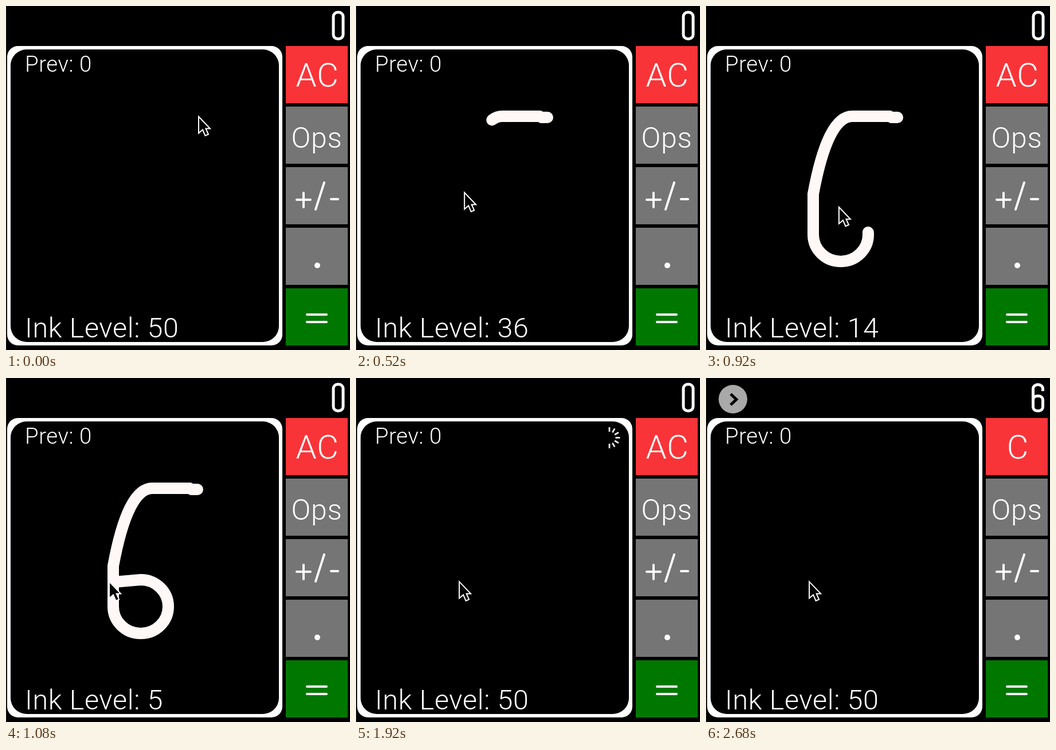
These frames come from a looping animation (600x602 px, 3440 ms). An HTML page with a canvas:

```html
<!DOCTYPE html>
<html lang="en">
<head>
<meta charset="utf-8">
<title>Handwriting calculator</title>
<style>
  html, body { margin: 0; width: 100%; height: 100%; overflow: hidden; background: #000; }
  canvas { display: block; width: 600px; height: 602px; }
</style>
</head>
<body>
<canvas id="stage" width="600" height="602"></canvas>
<script>
const ctx = document.getElementById('stage').getContext('2d');
const LOOP = 3440, STEP = 40;
const PEN_LAG = 120, INK_START = 270, INK_STOP = 1080, INK_RATE = 0.055;
const SPIN_START = 1440, SPIN_STEP = 80, RESULT = 2400, FADE = 200;

// A hand-drawn six: top bar, back, and a round bowl that closes on itself.
const SIX = 'M334 195H324L320 193H255Q212 193 187 329V400' +
  'A48 47 0 0 0 283 400A48 47 0 0 0 235 353L177 358';
const sixShape = new Path2D(SIX);
const sixGuide = document.createElementNS('http://www.w3.org/2000/svg', 'path');
sixGuide.setAttribute('d', SIX);

// Pen speed: [time, distance along the stroke].
const pace = [[320, 0], [360, 8], [480, 52], [640, 239], [920, 464], [1040, 540], [1100, 592]];

const arrowShape = new Path2D('M1 2V31L8 25L12.5 35.5L18 33L13.5 23H21Z');
const zeroShape = new Path2D();
zeroShape.roundRect(571, 11, 17, 46.5, 7.5);
const sixDigit = new Path2D('M570.5 40V19A8.5 7.5 0 0 1 587.5 19V23');
sixDigit.roundRect(570.5, 31.5, 17, 26, 7);

const clamp01 = v => Math.max(0, Math.min(1, v));

function penDistance(t) {
  return pace.slice(1).reduce((d, [t1, d1], i) => {
    const [t0, d0] = pace[i];
    return d + (d1 - d0) * clamp01((t - t0) / (t1 - t0));
  }, 0);
}

function box(x, y, w, h, radius, color) {
  ctx.fillStyle = color;
  ctx.beginPath();
  ctx.roundRect(x, y, w, h, radius);
  ctx.fill();
}

function disc(x, y, r, color) {
  box(x - r, y - r, 2 * r, 2 * r, r, color);
}

function stroke(path, width, color = '#fff', cap = 'round') {
  ctx.strokeStyle = color;
  ctx.lineWidth = width;
  ctx.lineCap = cap;
  ctx.stroke(typeof path === 'string' ? new Path2D(path) : path);
}

function label(text, x, y, size, align = 'left') {
  ctx.font = `300 ${size}px Roboto, sans-serif`;
  ctx.letterSpacing = size * 0.013 + 'px';
  ctx.textAlign = align;
  ctx.fillStyle = '#fff';
  ctx.fillText(text, x, y);
}

function drawButtons(fade) {
  for (let i = 0; i < 5; i++) {
    const color = i === 0 ? '#f93438' : i === 4 ? '#007800' : '#757575';
    box(488, 70 + i * 106, 108, 100, 0, color);
  }
  ctx.globalAlpha = 1 - fade;
  label('AC', 543, 141, 58, 'center');
  ctx.globalAlpha = fade;
  label('C', 544, 141, 58, 'center');
  ctx.globalAlpha = 1;

  label('Ops', 542, 248, 50, 'center');
  stroke('M507 339H531M519 327V352M540 356L555 309M567 338H579', 4);
  disc(543, 454, 5, '#fff');
  stroke('M525 540H559M525 553H559', 4);
}

function drawInk(t) {
  if (t < INK_START || t >= SPIN_START) return;
  const drawn = penDistance(Math.min(t, INK_STOP));
  ctx.setLineDash([Math.max(drawn, 0.1), 9999]);
  stroke(sixShape, 20, '#fff8f7');
  ctx.setLineDash([]);
}

function drawSpinner(t) {
  if (t < SPIN_START || t >= RESULT) return;
  const count = Math.min(12, 1 + Math.floor((t - SPIN_START) / SPIN_STEP));
  for (let i = 0; i < count; i++) {
    ctx.save();
    ctx.translate(442, 104.5);
    ctx.rotate(i * Math.PI / 6);
    stroke('M0 -10.5V-18.5', 2.8, '#eee', 'butt');
    ctx.restore();
  }
}

function drawNext(alpha) {
  ctx.globalAlpha = alpha;
  disc(47, 37, 25, '#a9a9a9');
  stroke('M43 28L53 37.5L43 47', 5, '#000', 'butt');
  ctx.globalAlpha = 1;
}

function drawPointer(t) {
  const { x, y } = sixGuide.getPointAtLength(penDistance(t + PEN_LAG));
  ctx.save();
  ctx.translate(x + 1, y - 3.5);
  ctx.fillStyle = '#000';
  ctx.fill(arrowShape);
  stroke(arrowShape, 2);
  ctx.restore();
}

function draw(t) {
  const progress = clamp01((t - RESULT + STEP) / FADE);
  const fade = 1 - (1 - progress) ** 2;
  const used = INK_RATE * Math.max(0, Math.min(t, INK_STOP) - INK_START);
  const ink = t < SPIN_START ? Math.round(50 - used) : 50;

  box(0, 0, 600, 602, 0, '#000');
  box(0, 0, 1, 602, 0, '#222');
  box(2, 70, 480, 524, 19, '#fff');
  box(8, 76, 468, 512, 28, '#000');
  drawButtons(fade);
  stroke(t < RESULT ? zeroShape : sixDigit, 5, '#fff', 'butt');
  drawNext(fade);
  label('Prev: 0', 33, 115, 38.5);
  label('Ink Level: ' + ink, 33, 580, 48.5);
  drawInk(t);
  drawSpinner(t);
  drawPointer(t);
}

function tick() {
  const t = performance.now() % LOOP;
  draw(Math.floor(t / STEP) * STEP);
  requestAnimationFrame(tick);
}
tick();
</script>
</body>
</html>
```
